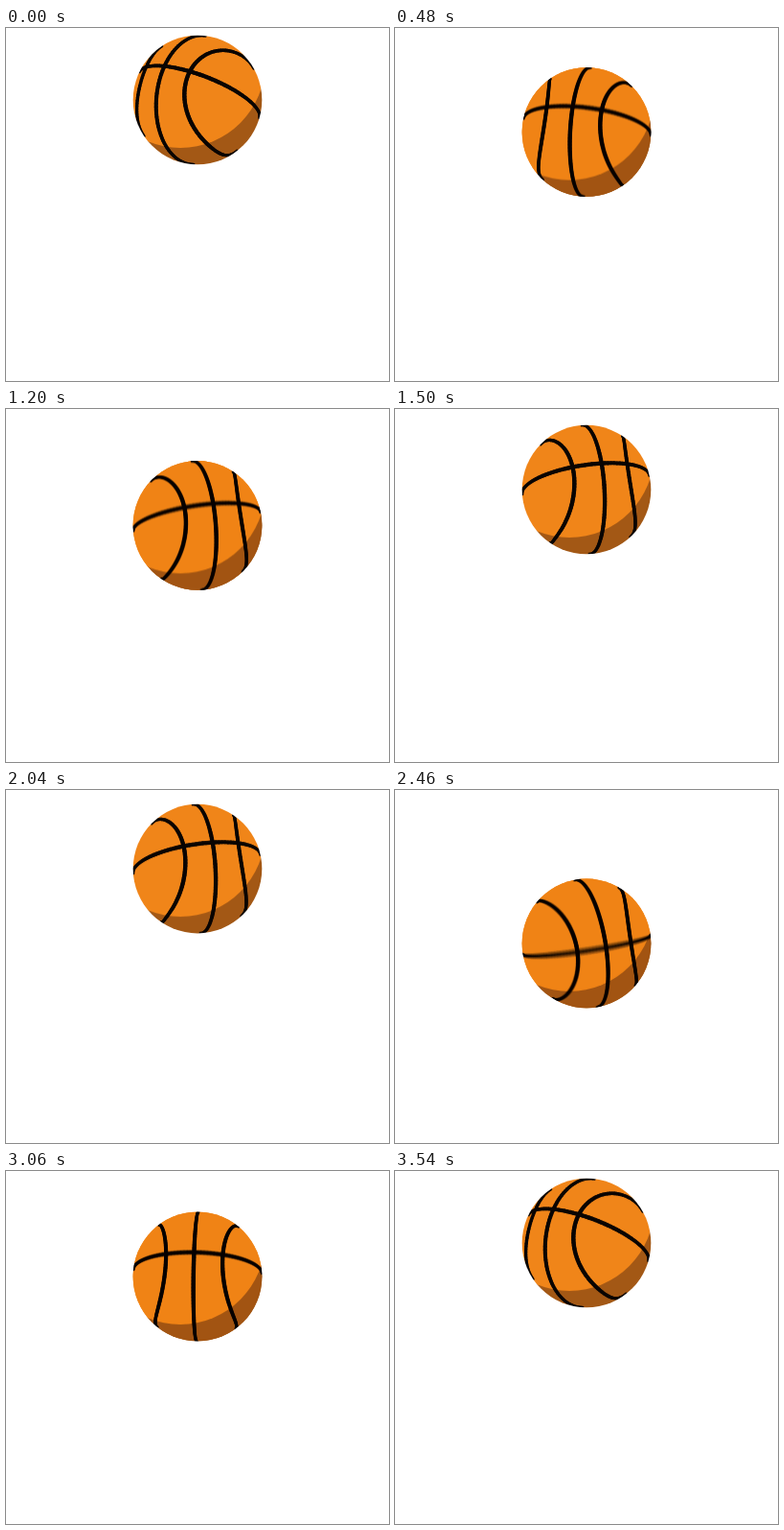
An HTML page with a canvas for the animation above (3.6 s loop, 400 by 368 pixels).

```html
<!DOCTYPE html>
<html lang="en">
<head>
<meta charset="utf-8">
<title>Bouncing ball</title>
<style>
  html, body { margin: 0; width: 400px; height: 368px; overflow: hidden; background: #fff; }
  canvas { display: block; }
</style>
</head>
<body>
<canvas id="stage" width="400" height="368"></canvas>
<script>
const LOOP = 3600, STEP = 60, END = 3540;
const CX = 200, TOP = 75, R = 67.3, DEPTH = 234;
const BOUNCES = [885, 2682], FALL = 885, RISE = 870;
const ORANGE = '#f08519', SHADE = '#a35815', INK = '#0a0503';

const clamp = u => Math.min(1, Math.max(0, u));
const smooth = u => (u = clamp(u), u * u * (3 - 2 * u));
const mix = (a, b, k) => a + (b - a) * k;

// Distance below the apex: gravity plus a sharper snap near the floor.
function drop(t) {
  const s = t - BOUNCES[t < LOOP / 2 ? 0 : 1];
  const u = clamp(1 + (s < 0 ? s / FALL : -s / RISE));
  return DEPTH * (s < 0 ? mix(u ** 5, u ** 2, 0.39) : mix(u ** 8, u ** 2, 0.45));
}

// Spin in degrees: turns in on the first fall, back on the last rise.
const yaw = t => mix(-42, 17, Math.min(smooth(t / 1028), smooth((END - t) / 800)));

// Height of the equator seam, which sinks as the ball drops below eye level.
const tilt = t => mix(-26, 15, smooth((drop(t) - 30) / 75));

const ctx = document.getElementById('stage').getContext('2d');
const layer = document.createElement('canvas');
layer.width = layer.height = 144;
const pen = layer.getContext('2d');
pen.translate(72, 72);
pen.lineCap = 'round';

function disc(c, x, y, r) {
  c.beginPath();
  c.arc(x, y, r, 0, 2 * Math.PI);
}

function projector(spin, e) {
  const a = spin * Math.PI / 180, p = Math.asin(0.78 * e / R), r = -a / 2;
  const ca = Math.cos(a), sa = Math.sin(a), cp = Math.cos(p), sp = Math.sin(p);
  const cr = Math.cos(r), sr = Math.sin(r);
  return ([x, y, z]) => {
    const x1 = x * ca + z * sa, z1 = z * ca - x * sa;
    const y1 = y * cp + z1 * sp;
    return [R * (x1 * cr - y1 * sr), R * (x1 * sr + y1 * cr), z1 * cp - y * sp];
  };
}

function seam(curve, project) {
  const n = 120;
  let prev = project(curve(0));
  for (let i = 1; i <= n; i++) {
    const next = project(curve(i / n * 2 * Math.PI));
    if (prev[2] > -0.06 && next[2] > -0.06) {
      pen.lineWidth = 2.8 + 1.6 * Math.max(0, next[2]);
      pen.beginPath();
      pen.moveTo(prev[0], prev[1]);
      pen.lineTo(next[0], next[1]);
      pen.stroke();
    }
    prev = next;
  }
}

// Seam around the side axis, flaring outwards at top and bottom.
const ring = side => f => {
  const x = side * (0.44 + 0.19 * Math.sin(f) ** 2);
  const r = Math.sqrt(1 - x * x);
  return [x, r * Math.sin(f), r * Math.cos(f)];
};
const equator = h => f => {
  const r = Math.sqrt(1 - h * h);
  return [r * Math.sin(f), h, r * Math.cos(f)];
};

function paintBall(spin, e) {
  pen.fillStyle = SHADE;
  pen.fillRect(-72, -72, 144, 144);
  pen.fillStyle = ORANGE;
  disc(pen, -17.8, -38.6, 88.5);
  pen.fill();
  pen.strokeStyle = INK;
  const project = projector(spin, e);
  for (let side = -1; side <= 1; side++) seam(ring(side), project);
  seam(equator(0.22 * e / R), project);
}

function draw(t) {
  const y = TOP + drop(t);
  const speed = Math.abs(drop(t + 5) - drop(t - 5)) / 10;
  const blur = Math.min(6, 6 * speed);
  const n = blur < 0.5 ? 1 : 9;
  ctx.fillStyle = '#fff';
  ctx.fillRect(0, 0, 400, 368);
  ctx.save();
  disc(ctx, CX, y, R);
  ctx.clip();
  // Average several tilts for the motion blur.
  for (let i = 0; i < n; i++) {
    const off = n > 1 ? blur * (2 * i / (n - 1) - 1) : 0;
    paintBall(yaw(t), tilt(t) + off);
    ctx.globalAlpha = 1 / (i + 1);
    ctx.drawImage(layer, CX - 72, y - 72);
  }
  ctx.restore();
}

const start = performance.now();
let shown = -1;
function tick() {
  const t = Math.floor((performance.now() - start) % LOOP / STEP) * STEP;
  if (t !== shown) draw(shown = t);
  requestAnimationFrame(tick);
}
tick();
</script>
</body>
</html>
```
